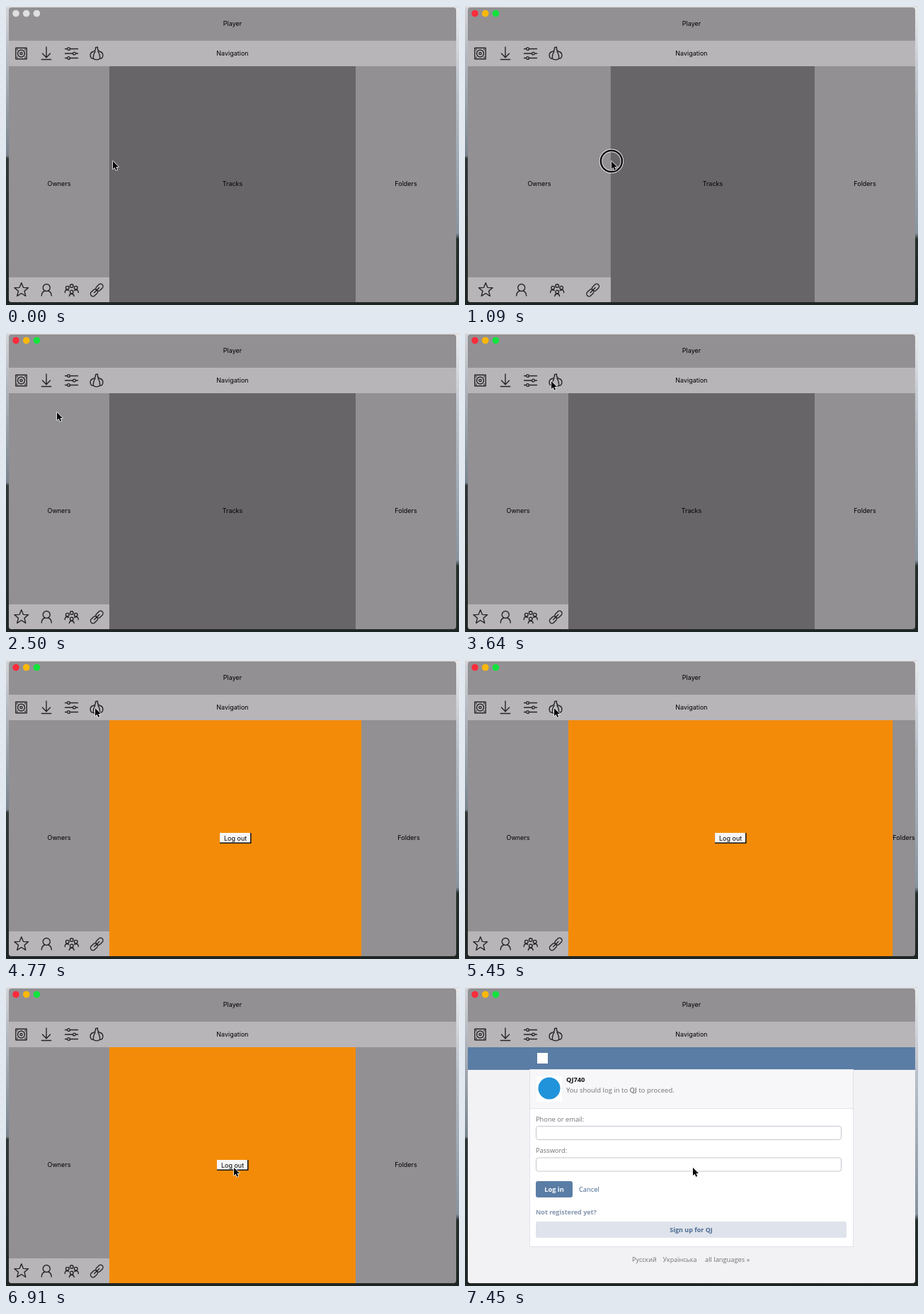
Recreate the animation shown at these times as an HTML page. Size 640 by 422 pixels, loop 7.49 s.

```html
<!DOCTYPE html>
<html lang="en">
<head>
<meta charset="utf-8">
<title>Player layout</title>
<style>
  html, body { margin: 0; width: 100%; height: 100%; overflow: hidden; background: #222827; }
  svg { display: block; width: 100vw; height: 100vh; }
  text { font: 9px Inter, "Liberation Sans", sans-serif; }
  .mid { text-anchor: middle; }
  .icon { fill: none; stroke: #262527; stroke-width: 1.4; stroke-linecap: round; stroke-linejoin: round; }
  #login text { font: 9.3px "Open Sans", "Noto Sans", sans-serif; fill: #707276; }
  #login .bold { font-weight: 700; }
  #login .field { fill: #fff; stroke: #c3c7ce; }
</style>
</head>
<body>
<svg viewBox="0 0 640 422" preserveAspectRatio="none">
  <defs>
    <linearGradient id="skyLeft" x2="0" y2="1">
      <stop offset="0" stop-color="#d3d4d8"/><stop offset=".25" stop-color="#a4abb3"/>
      <stop offset=".5" stop-color="#78848e"/><stop offset=".51" stop-color="#303636"/>
      <stop offset="1" stop-color="#1f2524"/>
    </linearGradient>
    <linearGradient id="skyRight" x2="0" y2="1">
      <stop offset="0" stop-color="#e9e9eb"/><stop offset=".3" stop-color="#b8bfc7"/>
      <stop offset=".76" stop-color="#8593a0"/><stop offset=".78" stop-color="#26302d"/>
      <stop offset="1" stop-color="#1e2624"/>
    </linearGradient>
    <clipPath id="windowClip"><rect x="4" y="2" width="632" height="416" rx="4"/></clipPath>
    <clipPath id="foldersClip"><rect id="foldersMask" y="85" width="142" height="333"/></clipPath>
  </defs>

  <rect width="320" height="422" fill="url(#skyLeft)"/>
  <rect x="320" width="320" height="422" fill="url(#skyRight)"/>
  <rect width="640" height="2" fill="#dedee1"/>

  <g clip-path="url(#windowClip)">
    <rect x="4" y="2" width="632" height="416" fill="#929093"/>
    <rect x="4" y="49" width="632" height="36" fill="#b7b5b8"/>
    <text class="mid" x="320" y="28">Player</text>
    <text class="mid" x="320" y="69.5">Navigation</text>
    <g id="lights"></g>
    <g id="nav"></g>

    <g id="panels">
      <rect id="center" y="85" height="333"/>
      <text id="tracks" class="mid" y="254">Tracks</text>
      <g id="logout">
        <rect x="-22" y="244" width="44.5" height="15" fill="#111"/>
        <rect x="-22" y="244" width="43" height="13.5" fill="#f5f5f5"/>
        <text class="mid" y="254.5">Log out</text>
      </g>
      <text id="owners" class="mid" y="254">Owners</text>
      <g clip-path="url(#foldersClip)"><text id="folders" class="mid" y="254">Folders</text></g>
      <rect id="footer" x="4" y="383" height="35" fill="#b7b5b8"/>
      <g id="tabs"></g>
    </g>

    <g id="login">
      <rect x="4" y="85" width="632" height="333" fill="#f2f2f5"/>
      <g id="form">
        <rect x="4" y="85" width="632" height="32" fill="#5a7da5"/>
        <rect x="102" y="93" width="15" height="15" fill="#fff"/>
        <rect x="91.5" y="116.5" width="457" height="250" fill="#fff" stroke="#dfe2e8"/>
        <rect x="92" y="117" width="456" height="54" fill="#f7f7f9"/>
        <path d="M92 171.5H548" stroke="#e3e5ea"/>
        <rect x="101" y="126" width="36" height="36" fill="#fff"/>
        <circle cx="119" cy="143" r="15.5" fill="#2093db"/>
        <text class="bold" x="143" y="134" style="fill:#111">QJ740</text>
        <text x="143" y="148.5" style="font-size:9.5px">You should log in to <tspan font-weight="600">QJ</tspan> to proceed.</text>
        <text x="100" y="189.5">Phone or email:</text>
        <rect class="field" x="100.5" y="196.5" width="431" height="19" rx="3"/>
        <text x="100" y="234">Password:</text>
        <rect class="field" x="100.5" y="241" width="431" height="19" rx="3"/>
        <rect x="100" y="274" width="52" height="23" rx="3" fill="#5a7da5"/>
        <text class="mid bold" x="126" y="289" style="fill:#fff">Log in</text>
        <text x="161" y="289" style="fill:#3c618c">Cancel</text>
        <text class="bold" x="100" y="320.5" style="fill:#8495ad;font-size:9px">Not registered yet?</text>
        <rect x="100" y="331" width="439" height="23" rx="3" fill="#dfe3eb"/>
        <text class="mid bold" x="319.5" y="346" style="fill:#4b6b92;font-size:9px">Sign up for QJ</text>
        <text x="236" y="388" style="font-size:9px">Русский</text>
        <text x="279.5" y="388" style="font-size:9px">Українська</text>
        <text x="339" y="388">all languages »</text>
      </g>
    </g>
  </g>

  <g id="cursor">
    <g id="ring" fill="none">
      <circle r="15" stroke="#eee" stroke-width="4.4"/>
      <circle r="15" stroke="#0b0b0b" stroke-width="2.5"/>
    </g>
    <path d="M0 0V11L2.6 8.7 4.3 12.7 6.2 11.9 4.5 8H8Z" fill="#080808"
          stroke="#f4f4f4" stroke-width="1.6" paint-order="stroke" stroke-linejoin="round"/>
  </g>
</svg>

<script>
const LOOP = 7490;
const $ = id => document.getElementById(id);
const set = (id, attrs) => {
  for (const name in attrs) $(id).setAttribute(name, attrs[name]);
};
const show = (id, on) => set(id, { display: on ? "inline" : "none" });
const within = (t, spans) => spans.some(([from, to]) => t >= from && t < to);

const starPath = "M" + Array.from({ length: 10 }, (_, i) => {
  const radius = i % 2 ? 4.5 : 10.3, angle = (i / 5 - .5) * Math.PI;
  return [radius * Math.cos(angle), radius * Math.sin(angle)].map(v => v.toFixed(2)).join(" ");
}).join("L") + "Z";
const dot = (x, y, r, extra = "") => `<circle cx="${x}" cy="${y}" r="${r}" ${extra}/>`;
const path = d => `<path d="${d}"/>`;
const icon = (x, y, body) => `<g class="icon" transform="translate(${x} ${y})">${body}</g>`;

const navIcons = [
  '<rect x="-7.7" y="-7.7" width="15.4" height="15.4"/>' + dot(0, 0, 5) + dot(0, 0, 1.6) +
    [-5.6, 5.6].map(x => dot(x, -5.6, .3) + dot(x, 5.6, .3)).join(""),
  path("M0-9V5.5M-5.5 0L0 5.7 5.5 0M-6.7 8.5H6.7"),
  [[-6.5, -4], [0, 4], [6.5, -4]].map(([y, x]) =>
    path(`M-9 ${y}H9`) + dot(x, y, 1.9, 'fill="#b7b5b8"')).join(""),
  path("M-1.5-8.4L1.4-9C1-4.5 2.5-3.2 5-2.5C10.5-1 10 7.2 4.5 7.4C3 9.3-3 9.3-4.5 7.4C-10 7.2-10.5-1-5-2.5C-2.5-3.2-1-4.5-1.5-8.4Z") +
    path("M-2-2.8C-4.5 1-5 4-4.5 7.4M2-2.8C4.5 1 5 4 4.5 7.4")
];
const person = (x, y) => dot(x, y, 2.3) + path(`M${x - 3.4} ${y + 6}Q${x - 3} ${y + 2.7} ${x} ${y + 2.7}T${x + 3.4} ${y + 6}`);
const tabIcons = [
  path(starPath),
  dot(0, -3.5, 5) + path("M-7 8C-7 3.5-5 2-2.5 1M7 8C7 3.5 5 2 2.5 1"),
  person(0, 2.5) + dot(0, -6, 2.3) + dot(-6, -3.3, 2.3) + dot(6, -3.3, 2.3) +
    path("M-9.5 3.5Q-9.5-.5-6-.5L-4 .5M9.5 3.5Q9.5-.5 6-.5L4 .5"),
  `<g transform="rotate(-45)"><rect x="-11" y="-3.5" width="11.5" height="7" rx="3.5"/>
   <rect x="-.5" y="-3.5" width="11.5" height="7" rx="3.5"/>${path("M-5 0H5")}</g>`
];

$("nav").innerHTML = navIcons.map((body, i) => icon(21.5 + 35.5 * i, 67, body)).join("");
$("tabs").innerHTML = tabIcons.map(body => icon(0, 401, body)).join("");
$("lights").innerHTML = [14, 28.7, 43.4].map(x => dot(x, 10.5, 4.8)).join("");

// Time, x, y
const cursorPath = [
  [0, 151, 219], [250, 151, 219], [450, 147, 219], [600, 147, 219], [1360, 231, 219],
  [2000, 147, 219], [2150, 147, 219], [2500, 72, 112], [2800, 57, 67], [3300, 57, 67],
  [3700, 126, 68], [5700, 126, 68], [6500, 322, 255], [LOOP, 322, 255]
];
const foldPath = [[0, 494], [4717, 494], [5663, 636], [5800, 636], [6746, 494], [LOOP, 494]];
const presses = [[600, 2050], [3800, 3900], [4590, 4700], [6800, 6880]];

const linear = k => k;
const smooth = k => k * k * (3 - 2 * k);
function along(keys, t, ease) {
  const i = keys.findIndex(key => key[0] > t);
  const a = keys[i - 1], b = keys[i];
  const k = ease((t - a[0]) / (b[0] - a[0]));
  return a.slice(1).map((v, j) => v + (b[j + 1] - v) * k);
}

function draw(t) {
  const [x, y] = along(cursorPath, t, smooth);
  const [right] = along(foldPath, t, linear);
  const left = t >= 600 && t < 2050 ? x - 1 : 146;
  const middle = (left + right) / 2;
  const account = t >= 3880;

  set("center", { x: left, width: right - left, fill: account ? "#f48b08" : "#686568" });
  set("tracks", { x: middle });
  set("logout", { transform: `translate(${middle} 0)` });
  show("tracks", !account);
  show("logout", account);

  set("owners", { x: (4 + left) / 2 });
  set("folders", { x: (right + 636) / 2 });
  set("foldersMask", { x: right, width: 636 - right });
  set("footer", { width: left - 4 });
  const cell = (left - 4) / 4;
  [...$("tabs").children].forEach((tab, i) =>
    tab.setAttribute("transform", `translate(${4 + cell * (i + .5)} 401)`));

  const colors = t < 600 ? ["#dfdfe0", "#dfdfe0", "#dfdfe0"] : ["#fb2c3c", "#fab80a", "#12e43d"];
  [...$("lights").children].forEach((light, i) => light.setAttribute("fill", colors[i]));

  show("panels", t < 6950);
  show("login", t >= 6950);
  show("form", t >= 7180);
  set("cursor", { transform: `translate(${x} ${y})` });
  show("ring", within(t, presses));
}

const start = performance.now();
function tick() {
  draw((performance.now() - start) % LOOP);
  requestAnimationFrame(tick);
}
tick();
</script>
</body>
</html>
```
